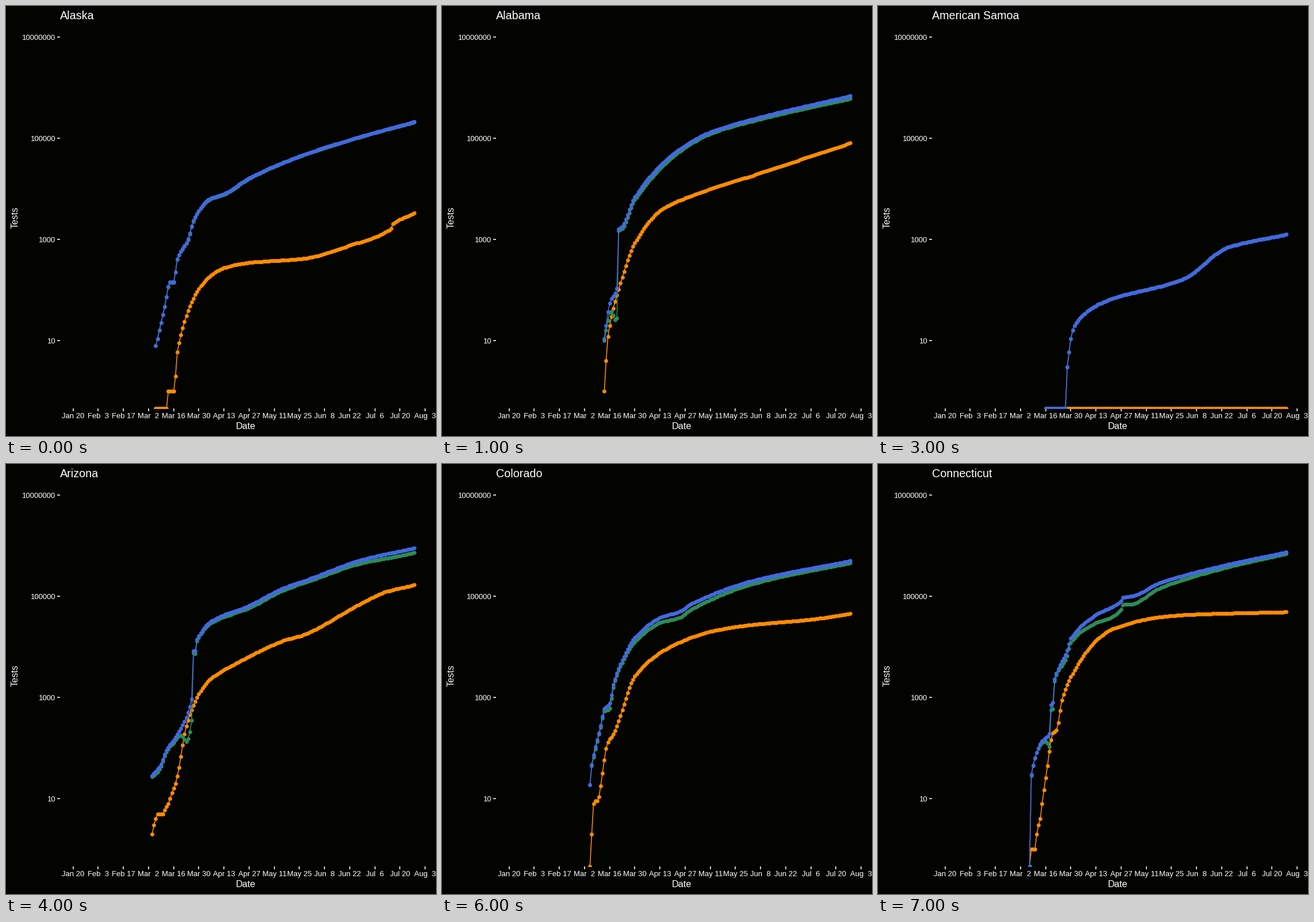
These frames come from a looping animation (748x748 px, 8 s). A matplotlib script:

```python
import numpy as np
import matplotlib.pyplot as plt
from matplotlib.animation import FuncAnimation
from matplotlib.patches import Rectangle

SIZE, DPI = 748, 88
PT = 72 / DPI                       # points per pixel
LEFT, RIGHT, BOTTOM = 93.6, 739.8, 700.4
ONE, DECADE, FLOOR = 670, 88, 700   # height of count 1, pixels per factor 10, zero
SHIFT = BOTTOM - FLOOR
MAR2, DAY, LAST = 247.97, 3.1247, 148
BACK = "#030300"

# Per state: key points (day since Mar 2, height) of all tests and of positives.
STATES = {
    "Alaska": (
        [(4, 590), (9, 523), (12, 480), (14, 480), (16, 440), (22, 405),
         (25, 373), (33, 337), (43, 325), (56, 299), (84, 261), (119, 226),
         (148, 201)],
        [(4, 700), (10, 700), (11, 670), (14, 670), (16, 601), (25, 508),
         (33, 473), (42, 455), (56, 446), (86, 439), (112, 416), (135, 387),
         (136, 379), (148, 360)]),
    "Alabama": (
        [(11, 578), (14, 516), (18, 491), (19, 388), (21, 383), (28, 332),
         (49, 258), (70, 219), (98, 193), (148, 156)],
        [(11, 670), (13, 575), (20, 482), (28, 412), (42, 356), (56, 334),
         (98, 290), (148, 238)]),
    "Arkansas": (
        [(4, 601), (6, 601), (7, 575), (9, 575), (14, 477), (21, 403),
         (25, 381), (28, 340), (41, 291), (57, 264), (84, 226), (112, 194),
         (148, 169)],
        [(4, 700), (9, 700), (10, 601), (15, 552), (18, 496), (25, 443),
         (42, 393), (54, 366), (69, 355), (98, 319), (119, 292), (148, 264)]),
    "American Samoa": (
        [(14, 700), (25, 700), (26, 628), (30, 555), (46, 515), (91, 474),
         (115, 420), (148, 397)],
        [(14, 700), (148, 700)]),
    "Arizona": (
        [(2, 541), (7, 521), (10, 497), (15, 475), (24, 409), (25, 325),
         (26, 325), (27, 305), (35, 273), (56, 246), (74, 217), (90, 199),
         (119, 166), (148, 146)],
        [(2, 643), (5, 608), (7, 608), (13, 573), (16, 543), (21, 456),
         (28, 400), (34, 375), (52, 341), (75, 307), (86, 297), (119, 241),
         (132, 222), (148, 210)]),
    "California": (
        [(2, 432), (6, 429), (9, 404), (13, 399), (14, 325), (16, 324),
         (25, 290), (32, 269), (33, 225), (35, 224), (50, 188), (51, 171),
         (84, 123), (112, 95), (148, 66)],
        [(2, 518), (3, 518), (11, 467), (14, 448), (17, 409), (23, 373),
         (27, 339), (33, 311), (44, 283), (63, 252), (98, 219), (112, 207),
         (148, 171)]),
    "Colorado": (
        [(3, 557), (4, 523), (9, 455), (11, 426), (14, 416), (16, 384),
         (20, 348), (28, 302), (42, 267), (53, 256), (60, 242), (92, 204),
         (148, 168)],
        [(3, 700), (4, 643), (5, 590), (7, 586), (13, 483), (16, 470),
         (28, 369), (42, 328), (58, 303), (70, 291), (91, 280), (126, 270),
         (148, 260)]),
    "Connecticut": (
        [(5, 700), (6, 540), (12, 482), (16, 469), (17, 419), (18, 415),
         (19, 374), (26, 324), (28, 303), (41, 264), (56, 238), (57, 232),
         (63, 229), (77, 207), (112, 177), (148, 153)],
        [(5, 700), (6, 670), (7, 670), (14, 546), (18, 468), (20, 463),
         (23, 411), (28, 370), (42, 307), (51, 287), (77, 266), (98, 261),
         (148, 257)]),
}


def smooth(t, keys):
    """Monotone cubic curve through the key points."""
    x, y = np.array(keys, float).T
    h = np.diff(x)
    d = np.diff(y) / h
    a, b = d[:-1], d[1:]
    same = a * b > 0
    inner = np.where(same, 2 * a * b / np.where(same, a + b, 1), 0)
    m = np.concatenate([d[:1], inner, d[-1:]])
    i = np.clip(np.searchsorted(x, t, side="right") - 1, 0, len(h) - 1)
    u = (t - x[i]) / h[i]
    v = 1 - u
    return (v * v * (1 + 2 * u) * y[i] + u * u * (1 + 2 * v) * y[i + 1]
            + h[i] * u * v * (v * m[i] - u * m[i + 1]))


def to_count(y):
    return np.where(y >= FLOOR, 0, np.rint(10 ** ((ONE - y) / DECADE)))


def to_height(n):
    return SHIFT + np.where(n > 0, ONE - DECADE * np.log10(np.maximum(n, 1)), FLOOR)


def series(total_keys, positive_keys):
    t = np.arange(total_keys[0][0], LAST + 1)
    total, positive = (to_count(smooth(t, k)) for k in (total_keys, positive_keys))
    return MAR2 + DAY * t, [to_height(n) for n in (positive, total - positive, total)]


plt.rcParams["font.family"] = "Liberation Sans"
fig = plt.figure(figsize=(SIZE / DPI, SIZE / DPI), dpi=DPI, facecolor=BACK)
ax = fig.add_axes([0, 0, 1, 1])
ax.set_xlim(0, SIZE)
ax.set_ylim(SIZE, 0)
ax.axis("off")


def label(x, y, s, px, **kw):
    return ax.text(x, y, s, fontsize=px * PT, color="white", va="baseline", **kw)


def tick(xs, ys):
    ax.plot(xs, ys, color="white", lw=1.58 * PT, solid_capstyle="butt")


for power in (1, 3, 5, 7):
    y = ONE + SHIFT - DECADE * power
    label(86.3, y + 4.7, str(10 ** power), 13.1, ha="right")
    tick([LEFT - 4.1, LEFT], [y, y])

dates = ["Jan 20", "Feb  3", "Feb 17", "Mar  2", "Mar 16", "Mar 30", "Apr 13",
         "Apr 27", "May 11", "May 25", "Jun  8", "Jun 22", "Jul  6", "Jul 20",
         "Aug  3"]
for i, date in enumerate(dates):
    x = MAR2 + DAY * 14 * (i - 3)
    label(x, 717.4, date, 13.1, ha="center")
    tick([x, x], [BOTTOM, BOTTOM + 4.1])

label((LEFT + RIGHT) / 2, 736.4, "Date", 16.3, ha="center")
label(21, 367.7, "Tests", 16.3, ha="center", rotation=90, rotation_mode="anchor")
title = label(LEFT, 23, "", 19.7, ha="left")

panel = Rectangle((LEFT, 0), RIGHT - LEFT, BOTTOM, transform=ax.transData)
lines = []
for color in ("darkorange", "seagreen", "royalblue"):
    line, = ax.plot([], [], "o-", color=color, lw=1.58 * PT, ms=6.85 * PT, mew=0)
    line.set_clip_path(panel)
    lines.append(line)

charts = [(name, *series(*keys)) for name, keys in STATES.items()]


def draw(i):
    name, x, heights = charts[i]
    title.set_text(name)
    for line, y in zip(lines, heights):
        line.set_data(x, y)
    return [title, *lines]


anim = FuncAnimation(fig, draw, frames=len(charts), interval=1000, repeat=True,
                     repeat_delay=0)
plt.show()
```
